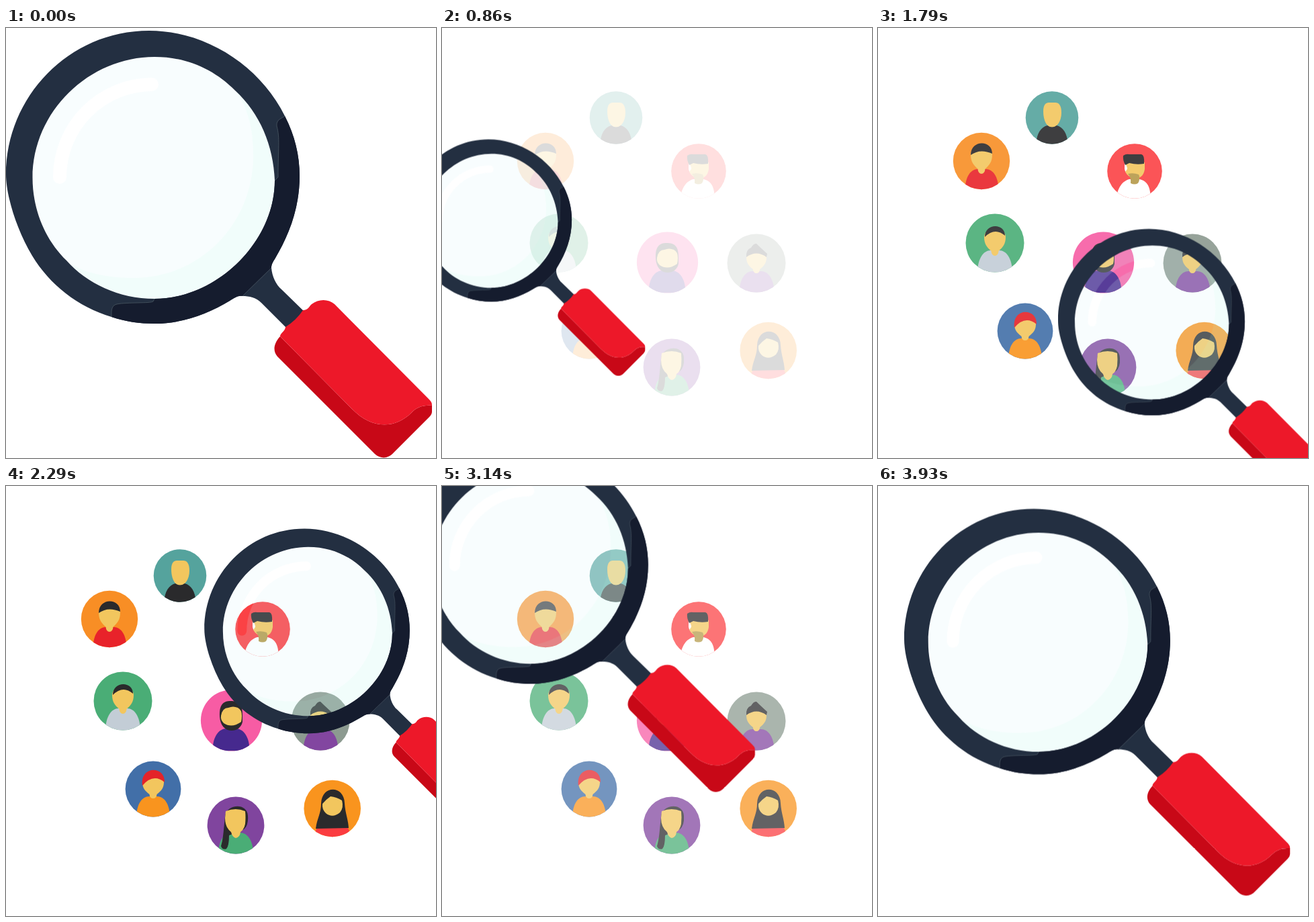
An HTML page that plays this animation: 640x640 px, repeating every 4000 ms.

```html
<!DOCTYPE html>
<html lang="en">
<head>
<meta charset="utf-8">
<title>Searching for people</title>
<style>
html, body { margin: 0; height: 100%; overflow: hidden; background: #fff; }
svg { display: block; width: 100vw; height: 100vh; }
</style>
</head>
<body>
<svg viewBox="0 0 640 640">
  <defs>
    <mask id="shine" maskUnits="userSpaceOnUse" x="0" y="0" width="640" height="640">
      <path fill="#fff" d="M0 0H640V640H0Z"/>
      <path d="M217 84A138 138 0 0 0 80 222" fill="none" stroke="#000" stroke-width="20" stroke-linecap="round"/>
    </mask>
  </defs>
  <g id="people"></g>
  <g id="magnifier">
    <g mask="url(#shine)">
      <path fill="#d6f1f6" fill-opacity=".17" d="M221 43C270 43 310 62 341 93C378 127 398 175 400 227C400 318 314 403 221 403C168 403 120 380 90 346C58 315 39.5 270 39.5 223C39.5 124 124 43 221 43Z"/>
      <path fill="#bcfcde" fill-opacity=".1" d="M341 93C378 127 398 175 400 227C400 318 314 403 221 403C168 403 120 380 90 346C112 364 150 372 190 372C290 372 368 290 368 190C368 150 360 118 341 93Z"/>
    </g>
    <path fill="#232f41" fill-rule="evenodd" d="M213 4C297 4 378 56 415 131C430 160 437 190 437 220C437 270 420 310 400 344C396 350 395 353 395 357L352 399C345 398 340 402 333 406C300 426 262 440 221 440C199 440 178 437 157 430C107 415 65 382 39 339C15 299 0 248 0 218C0 103 93 4 213 4ZM221 43C270 43 310 62 341 93C378 127 398 175 400 227C400 318 314 403 221 403C168 403 120 380 90 346C58 315 39.5 270 39.5 223C39.5 124 124 43 221 43Z"/>
    <path fill="#151c2e" d="M415 131C410 135 402 136 403 146C408 163 405 180 405 222L400 227C400 318 314 403 221 403L219 407C215 410 180 408 165 411C156 413 157 422 157 430C178 437 199 440 221 440C262 440 300 426 333 406C340 402 345 398 352 399L395 357C395 353 396 350 400 344C420 310 437 270 437 220C437 190 430 160 415 131Z"/>
    <path fill="none" stroke="#5a6871" stroke-width=".6" d="M415 131C410 135 402 136 403 146C408 163 405 180 405 222L400 227M221 403L219 407C215 410 180 408 165 411C156 413 157 422 157 430M352 399L395 357"/>
    <path fill="#232f41" d="M395 357C396 370 402 382 410 389L450 428L424 453L380 409C372 401 362 399 352 399Z"/>
    <path fill="#c80817" d="M408 459L515 567C545 598 580 596 603 573C612 564 620 561 634 562V571Q634 575 630 579L577 632C569 641 558 642 549 634L404 489C397 481 398 470 408 459Z"/>
    <path fill="#ed1829" d="M442 420C450 420 451 414 455 411C465 403 480 403 489 411L629 552C634 557 634 559 634 562C620 561 612 564 603 573C580 596 545 598 515 567L408 459C408 454 415 452 416 445Q432 435 442 420Z"/>
  </g>
</svg>
<script>
const SKIN = '#f2c65e', BLACK = '#2a2a2c', GREEN = '#4aad76', AMBER = '#f9941e', PURPLE = '#8246a0';

// Shoulders: centre x, top y, half width, height
const torso = (x, y, w, h) =>
  `M${x - w} ${y + h}C${x - w} ${y + h * .35} ${x - w * .65} ${y} ${x - w * .25} ${y}H${x + w * .25}C${x + w * .65} ${y} ${x + w} ${y + h * .35} ${x + w} ${y + h}Z`;
// Face narrowing to the neck: centre x, top y, half width, height
const face = (x, y, w, h) =>
  `M${x - w} ${y + h * .3}C${x - w} ${y - h * .1} ${x + w} ${y - h * .1} ${x + w} ${y + h * .3}C${x + w} ${y + h * .56} ${x + w * .75} ${y + h * .68} ${x + w * .35} ${y + h * .82}Q${x + w * .3} ${y + h} ${x} ${y + h}Q${x - w * .3} ${y + h} ${x - w * .35} ${y + h * .82}C${x - w * .75} ${y + h * .68} ${x - w} ${y + h * .56} ${x - w} ${y + h * .3}Z`;

// Centre x, y, radius, backdrop, then colour and path pairs
const avatars = [
  [259, 133.5, 39.3, '#55a39d',
    SKIN, 'M246 124C246 114 250 111 254 111H264C269 111 273 115 273 126C273 139 266 148 259 148S246 139 246 124Z',
    BLACK, 'M235 175C236 157 242 148 252 145Q259 150 266 145C276 148 282 157 283 175Z'],
  [154, 198, 42.2, '#f88e25',
    '#e8232a', torso(154.5, 210, 25, 32), SKIN, face(154, 176, 16, 41),
    BLACK, 'M138 189C138 166 170 166 170 187Q152 179 138 189Z'],
  [382, 213, 40.8, '#fb4245',
    '#fff', 'M354 256C357 236 364 228 374 225H389C399 227 406 234 406 256ZM367 200H373V217Q368 216 367 210Z',
    SKIN, 'M372 200H397V210Q395 224 382 224Q372 222 368 214Q374 209 368 202Z',
    '#b59a4a', 'M372 217Q380 215 388 218Q391 224 387 231Q382 234 376 231Q377 223 372 217Z',
    BLACK, 'M365 190Q369 187 374 188H392Q397 189 396 202Q385 204 374 201L368 204Q364 196 365 190Z'],
  [174, 320, 43.5, GREEN,
    '#c3cdd6', torso(174, 331, 26, 34), SKIN, face(174, 299, 16, 40),
    BLACK, 'M159 311C159 290 189 290 189 309Q174 296 159 311Z'],
  [335.5, 349, 45.6, '#f75ca4',
    '#46298e', torso(335, 361, 27.5, 33),
    BLACK, 'M318 343C317 325 324 320 334 320C347 320 352 325 352 342V351C350 360 343 364 336 364C326 364 319 357 318 343Z',
    SKIN, 'M320 342Q322 330 331 330Q338 327 345 330Q351 333 351 342Q351 347 350 351Q336 361 324 353Q319 348 320 342Z'],
  [468, 350, 43.5, '#8c9a90',
    PURPLE, torso(468.5, 362, 26, 33), SKIN, face(468, 331, 15, 34),
    BLACK, 'M453 341Q452 330 460 327Q464 320 468 321Q473 326 484 336L483 341Q468 330 453 341Z'],
  [219, 451, 41.4, '#426fa8',
    AMBER, torso(219, 462, 25, 32), SKIN, face(219, 430, 16, 35),
    '#e42329', 'M203 446C199 416 237 416 236 441Q219 427 203 446Z'],
  [342, 505, 42.4, '#80459e',
    GREEN, torso(342, 516, 26, 32),
    BLACK, 'M326 492C327 474 359 470 360 491Q361 505 354 511L332 520Q332 536 328 540Q322 542 320 536C324 522 324 508 326 492Z',
    SKIN, 'M327 484Q342 478 356 484Q357 493 356 503Q354 512 349 515Q348 523 342 524Q337 523 335 515Q326 508 326 494Z'],
  [485.7, 480, 42.3, AMBER,
    '#fb3c40', 'M455 524L463 509H509L516 524Z',
    BLACK, 'M461 510C463 494 469 488 469 472C470 445 503 445 504 472C505 488 509 494 510 509Z',
    SKIN, 'M471 473Q477 466 483 462Q492 463 500 468Q503 479 497 486Q486 495 476 487Q470 481 471 473Z'],
];

const people = document.getElementById('people');
const magnifier = document.getElementById('magnifier');
people.innerHTML = avatars.map(([x, y, r, color, ...parts], i) => {
  const circle = `<circle cx="${x}" cy="${y}" r="${r}"`;
  let shapes = '';
  for (let j = 0; j < parts.length; j += 2) shapes += `<path fill="${parts[j]}" d="${parts[j + 1]}"/>`;
  return `<clipPath id="clip${i}">${circle}/></clipPath>${circle} fill="${color}"/><g clip-path="url(#clip${i})">${shapes}</g>`;
}).join('');

const LOOP = 4000, FRAME = LOOP / 56;

// Time, x and y of the magnifier's middle
const route = [
  [0, 317, 322], [280, 318, 156], [430, 244, 169], [600, 178, 223], [890, 126, 357],
  [1210, 186, 500], [1500, 328, 560], [1790, 471, 500], [2080, 529, 373], [2290, 516, 284],
  [2540, 429, 183], [2790, 309, 157], [2860, 283, 163], [3180, 205, 205], [3500, 215, 265],
  [3930, 326.5, 322.3],
];
const clamp = v => Math.min(1, Math.max(0, v));

function slope(i, axis) {
  const a = route[Math.max(0, i - 1)], b = route[Math.min(route.length - 1, i + 1)];
  return (b[axis] - a[axis]) / (b[0] - a[0]);
}

// Smooth cubic through the route
function along(t, axis) {
  let i = 0;
  while (i < route.length - 2 && t >= route[i + 1][0]) i++;
  const a = route[i], b = route[i + 1], d = b[0] - a[0], u = clamp((t - a[0]) / d), v = 1 - u;
  return v * v * (1 + 2 * u) * a[axis] + u * u * (1 + 2 * v) * b[axis]
    + u * v * d * (v * slope(i, axis) - u * slope(i + 1, axis));
}

function draw(now) {
  const t = Math.floor((now % LOOP + 6) / FRAME) % 56 * FRAME;
  const s = 1 - .446 * clamp(t / 290) + Math.max(0, t - 1130) * .0001257;
  magnifier.setAttribute('transform',
    `translate(${along(t, 1) - 317 * s} ${along(t, 2) - 322 * s}) scale(${s})`);
  people.style.opacity = clamp((t - 640) / 1270) * clamp((3925 - t) / 1065);
}

const start = performance.now();
function tick() {
  draw(performance.now() - start);
  requestAnimationFrame(tick);
}
tick();
</script>
</body>
</html>
```
